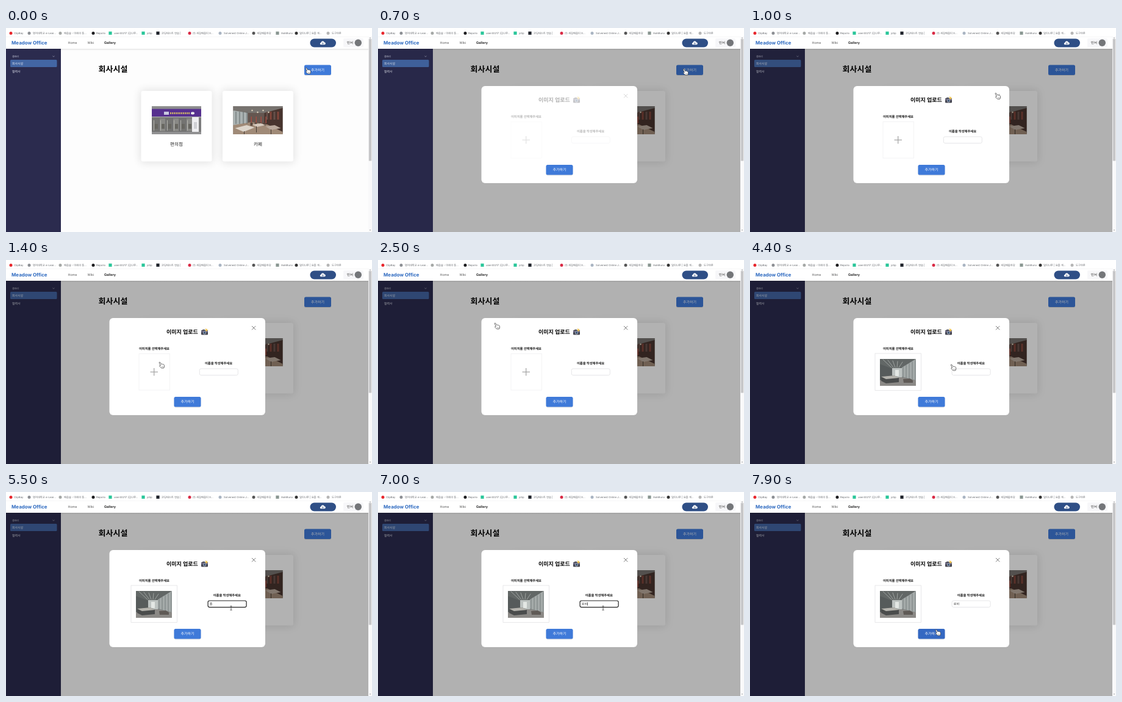
Recreate the animation shown at these times as an HTML page. Size 600x334 px, loop 8000 ms.

```html
<!DOCTYPE html>
<html lang="ko">
<head>
<meta charset="utf-8">
<title>Gallery upload</title>
<style>
  html, body { margin: 0; width: 100%; height: 100%; overflow: hidden; background: #fff; }
  svg { display: block; width: 100vw; height: 100vh; }
  svg svg { width: auto; height: auto; }
  text { font-family: Inter, "Noto Sans CJK KR", "Noto Sans CJK", sans-serif; white-space: pre; text-rendering: geometricPrecision; }
</style>
</head>
<body>
<svg id="stage" viewBox="0 0 600 334" xmlns="http://www.w3.org/2000/svg">
  <defs>
    <filter id="soft" x="-30%" y="-30%" width="160%" height="160%"><feGaussianBlur stdDeviation="7"/></filter>
    <linearGradient id="fade" x1="0" y1="0" x2="0" y2="1">
      <stop offset="0" stop-opacity=".1"/><stop offset="1" stop-opacity="0"/>
    </linearGradient>
    <clipPath id="pageClip"><rect y="34" width="594" height="300"/></clipPath>
  </defs>
  <g id="page" clip-path="url(#pageClip)"></g>
  <rect id="sideShade" y="34" width="90" height="300"/>
  <rect id="mainShade" x="90" y="34" width="504" height="300" opacity=".3"/>
  <g id="chrome"></g>
  <g id="modal"></g>
  <g id="hand">
    <path d="M-4-4.2C-3.6-5.2-2.5-5-2-4.1L-.3-1.2C.2-2 1-1.9 1.4-1.2 2-1.8 2.8-1.5 3-.8 3.8-1 4.3-.4 4.4.4L4.6 2.8 3.6 5H-.3L-3 2.2C-3.9 1.2-3 .3-2.1.7L-1.6 1Z"
      fill="#fff" stroke="#333" stroke-width=".7" stroke-linejoin="round"/>
    <path d="M.4 2V3.8M1.8 2V3.8M3.1 2V3.8" stroke="#555" stroke-width=".4"/>
  </g>
  <path id="beam" d="M-1.5-3.5Q0-3.5 0-2.7Q0-3.5 1.5-3.5M0-2.7V2.7M-1.5 3.5Q0 3.5 0 2.7Q0 3.5 1.5 3.5" fill="none" stroke="#333" stroke-width=".8"/>
</svg>
<script>
const $ = id => document.getElementById(id);
const LOOP = 8000, STEP = 100;

// y is the visual middle of the line
const text = (x, y, size, str, fill = '#111', extra = '') =>
  `<text x="${x}" y="${y + size * .37}" font-size="${size}" fill="${fill}" ${extra}>${str}</text>`;
const rect = (x, y, w, h, fill, extra = '') =>
  `<rect x="${x}" y="${y}" width="${w}" height="${h}" fill="${fill}" ${extra}/>`;
const path = (d, fill, extra = '') => `<path d="${d}" fill="${fill}" ${extra}/>`;
const dot = (x, y, r, fill) => `<circle cx="${x}" cy="${y}" r="${r}" fill="${fill}"/>`;
const line = (d, color, w) => path(d, 'none', `stroke="${color}" stroke-width="${w}" stroke-linecap="round"`);
const mid = 'text-anchor="middle"', bold = 'font-weight="700"';
const photo = (x, y, body) => `<g transform="translate(${x} ${y})">${body}</g>`;
const button = (x, y, w, h, id) =>
  rect(x, y + 1, w, h, '#000', 'rx="2.5" opacity=".12"') +
  rect(x, y, w, h, '#3f7ad9', `rx="2.5" id="${id}"`) +
  text(x + w / 2, y + h / 2, 6, '추가하기', '#fff', mid);

function shopPhoto() {
  let s = rect(0, 0, 81, 46, '#7d7d7e') + rect(0, 0, 81, 5, '#8d8d8e') +
    rect(0, 4.5, 81, 13, '#56308f') + rect(0, 17, 81, 1.5, '#aaa9ad') +
    rect(20, 9, 8, 5, '#c9c8e0') + rect(64, 9.5, 6, 4, '#eee', 'rx="2"') +
    rect(0, 18.5, 66, 24, '#727272');
  for (let i = 0; i < 11; i++) s += rect(30 + i * 3, 10, 2, 3, '#c8ae6a');
  for (let i = 0; i < 6; i++)
    s += rect(2 + i * 11, 20, 9, 21, i % 2 ? '#898986' : '#747472') +
      rect(3 + i * 11, 23, 1, 17, '#b3b3ac') + rect(5 + i * 11, 29, 5, 8, '#686761');
  return s + rect(66, 18, 11, 25, '#eeeef0') + rect(69, 26, 5, 11, '#cfd0d4') + rect(0, 42, 81, 4, '#929293');
}

function cafePhoto() {
  let s = rect(0, 0, 81, 46, '#5c4c45') + path('M0 0H81V5L52 12 24 11 0 8Z', '#77736f') +
    path('M0 7 24 11V29L0 32Z', '#aab2b2') + rect(24, 11, 27, 17, '#655650') +
    path('M51 11 81 3V44L51 31Z', '#47342e') + path('M0 31 30 26 56 30 81 42V46H0Z', '#a08a77');
  for (let i = 0; i < 4; i++)
    s += rect(4 + i * 6, 9, 1, 20, '#5f6766') + rect(54 + i * 6, 9, 3, 13, i % 2 ? '#81453a' : '#66504a') +
      rect(29 + i * 8, 17, 1.5, 11, '#a34d42') + rect(28 + i * 7, 27, 4, 5, '#59463c') +
      dot(31 + i * 9, 7 + i % 2 * 3, 1.2, '#e0d4bd');
  return s + path('M3 36 22 31 35 35 17 42Z', '#ddd5cb') + path('M31 30 45 28 53 31 39 34Z', '#d5c9bd') +
    path('M53 33 68 31 78 36 62 39Z', '#b9a99c') + path('M18 41V46M62 38V46M38 33V43', 'none', 'stroke="#443a32"');
}

function lobbyPhoto() {
  let s = rect(0, 0, 59, 44, '#7f8484') + path('M0 0H59L36 15 20 17 0 8Z', '#626766') +
    path('M0 8 20 16V31L0 35Z', '#565b5b') + path('M36 14 59 0V35L36 29Z', '#a4aaa9') +
    rect(20, 15, 16, 15, '#bdc3c1') + path('M0 35 20 30H36L59 35V44H0Z', '#8b8986');
  for (let i = 0; i < 5; i++)
    s += line(`M${38 + i * 5} ${13 - i * 2.7}V${30 + i}`, '#6e7574', .8) +
      line(`M${5 + i * 8} ${1 + i}L${19 + i * 3} 14`, '#c8cdca', .6);
  return s + path('M2 29 24 27 31 31V38L10 40 2 36Z', '#4a4c4c') + path('M2 29 24 27 31 31 10 33Z', '#b4b3ad') +
    rect(25, 18, 6, 10, '#e3e7e4') + path('M38 33 49 32 54 35V39H39Z', '#5f5a56');
}

function card(x, label, body) {
  return rect(x - 2, 101, 120, 120, '#000', 'rx="6" opacity=".1" filter="url(#soft)"') +
    rect(x, 103, 116, 115.5, '#fff', 'rx="3"') + photo(x + 17.5, 128, body) +
    text(x + 58, 190, 7.6, label, '#222', mid);
}

$('page').innerHTML =
  rect(0, 34, 594, 300, '#fdfdfd') +
  rect(0, 34, 90, 300, '#2b2b4e') +
  rect(7, 52, 76.5, 12, '#4366a4', 'rx="1.5"') +
  text(10, 47, 4, '갤러리', '#d5d7e4') +
  line('M76.7 46 78 47.2 79.3 46', '#b9bccd', .6) +
  text(10, 58, 4.9, '회사시설', '#e9ecf5') +
  text(10, 71, 4.9, '협력사', '#e9ecf5') +
  text(151.5, 67.5, 13, '회사시설', '#000', bold) +
  button(489, 60.5, 44, 16.5, 'openBtn') +
  card(221.5, '편의점', shopPhoto()) +
  card(355, '카페', cafePhoto());

// icon x, label, icon colour, label x, square icon
const marks = [
  [8, 'ClipBay', '#e8262c', 13], [38, '명지대학교 e-Lear...', '#8c8f94', 44],
  [89, '배움숲 - 미래의 동...', '#a5a8a6', 95], [143, 'Repolio', '#1d1d1f', 148],
  [171, 'user40217 (김나루...', '#2cc79b', 177, true], [225, 'jotip', '#2cc79b', 231, true],
  [249, '코딩테스트 연습 |', '#20242c', 255, true], [301, '(1) 새길배움터 X...', '#d92a45', 306],
  [351, 'Solvenest Online J...', '#a9b4c2', 357], [406, '새길배움마당', '#555', 411],
  [445, 'AskMuno', '#8a9792', 451, true], [476, '일터나루 | 요즘 개...', '#333', 481],
  [528, '도구마루', '#b5b5b5', 534]
];
const mark = ([x, str, color, tx, square]) =>
  (square ? rect(x - 2.6, 5.8, 5.2, 5.2, color) : dot(x, 8.4, 2.5, color)) + text(tx, 8.4, 4.3, str, '#63666b');

$('chrome').innerHTML =
  rect(0, 0, 600, 34, '#fff') + rect(0, 34, 594, 3, 'url(#fade)') + rect(0, 14, 600, .6, '#f0f0f2') +
  marks.map(mark).join('') +
  text(9, 24.3, 7.9, 'Meadow Office', '#2e6ac0', bold) +
  text(101.5, 24.3, 5.3, 'Home', '#555') + text(133.5, 24.3, 5.3, 'Wiki', '#555') +
  text(161, 24.3, 5.5, 'Gallery', '#111', 'font-weight="600"') +
  rect(498.5, 17.5, 42.5, 14, '#2f4f86', 'rx="7"') +
  path('M516.5 27.3C514.3 27.3 514.3 24.2 516.4 24 516.6 20.8 521 20.6 521.7 23.3 524.4 23.2 524.6 27.3 522 27.3Z', '#fff') +
  line('M519.3 26.5V24.3M518.2 25.3 519.3 24.2 520.4 25.3', '#2f4f86', .7) +
  rect(553, 17, 33, 14.5, '#f7f7f9', 'rx="2"') +
  text(559, 24.3, 5.5, '민서', '#222') + dot(577.3, 24.3, 5.7, '#747679') +
  rect(594, 14.6, 6, 319.4, '#f9f9fa') + rect(594.8, 18, 4.4, 199.5, '#c6c6c8') +
  path('M595.8 16.8H598.2L597 15.5ZM595.8 330.5H598.2L597 331.8Z', '#777');

const camera =
  rect(322, 113.6, 4, 2, '#6f7079') + rect(320, 115, 11, 7.5, '#43444f', 'rx="1"') +
  rect(320, 116.6, 11, 1.2, '#8c84ad') + path('M328 112 329 113.7 331 113.3 329.8 115 330.6 116.5H326.8L327.5 114.6 326.4 113.4Z', '#f0c34a') +
  dot(325.5, 119, 2.7, '#a3a5b3') + dot(325.5, 119, 1.8, '#3d5878');

$('modal').innerHTML =
  rect(169.5, 95, 255.5, 159, '#fff', 'rx="6"') +
  '<g id="form">' +
  text(263, 118, 9, '이미지 업로드', '#000', bold) + camera +
  line('M403.4 108.4 409 114M409 108.4 403.4 114', '#777', 1) +
  text(243, 145.2, 5.3, '이미지를 선택해주세요', '#111', `${mid} ${bold}`) +
  '<g id="empty">' + rect(218, 153.5, 50.5, 59.5, '#fff', 'stroke="#f0f0f2" stroke-width=".8"') +
  path('M236.5 183.3H249M242.7 177V189.5', 'none', 'stroke="#a8a8a8" stroke-width="1.3"') + '</g>' +
  '<g id="chosen">' + rect(205, 153, 75.5, 60.5, '#fff', 'stroke="#e2e2e4" stroke-width=".8"') +
  photo(213, 162, lobbyPhoto()) + '</g>' +
  '<g id="field">' + text(348.5, 169, 5.3, '이름을 작성해주세요', '#111', `${mid} ${bold}`) +
  rect(317.3, 178, 63, 10.6, '#fff', 'id="input" rx="2.5"') +
  text(320, 183.4, 5, '', '#333', 'id="value"') +
  rect(320.2, 180.6, .6, 5.4, '#222', 'id="caret"') + '</g></g>' +
  button(275.5, 224, 44, 16.5, 'addBtn');

const cursor = [
  [0, 495, 70], [100, 495, 70], [400, 504, 72], [700, 504, 72], [1400, 255, 172], [1600, 255, 172],
  [2400, 195, 108], [2500, 195, 108], [3100, 158, 103], [3300, 158, 103], [3600, 140, 100],
  [4100, 140, 100], [4500, 369, 190], [7000, 369, 190], [7700, 308, 230], [LOOP, 308, 230]
];
const typed = [[0, ''], [5100, 'ㄹ'], [5400, '로'], [5500, '롭'], [6000, '로비']];

const ramp = (t, a, b) => Math.min(1, Math.max(0, (t - a) / (b - a)));
const ease = p => p * p * (3 - 2 * p);
const show = (id, on) => $(id).setAttribute('visibility', on ? 'inherit' : 'hidden');
const set = (id, attrs) => { for (const k in attrs) $(id).setAttribute(k, attrs[k]); };

function cursorAt(t) {
  const i = cursor.findIndex((k, n) => n && t <= k[0]);
  const [t0, x0, y0] = cursor[i - 1], [t1, x1, y1] = cursor[i];
  const p = ease(ramp(t, t0, t1));
  return [x0 + (x1 - x0) * p, y0 + (y1 - y0) * p];
}

function draw(t) {
  const open = t >= 700, chosen = t >= 4100, focused = t >= 4500 && t < 7500;
  show('modal', open);
  show('mainShade', open);
  show('sideShade', open);
  set('sideShade', { opacity: .06 + .24 * ramp(t, 700, 1100) });
  set('form', { opacity: .3 + .7 * ramp(t, 700, 1000) });

  show('empty', !chosen);
  show('chosen', chosen);
  set('field', { transform: `translate(${chosen ? 13.8 : 0} 0)` });
  set('input', { stroke: focused ? '#222' : '#dcdcdf', 'stroke-width': focused ? 1.2 : .7 });

  const value = typed.filter(k => t >= k[0]).pop()[1];
  $('value').textContent = value;
  const blink = t < 4900 || (t >= 6000 && Math.floor(t / 500) % 2 === 0);
  show('caret', focused && blink);
  set('caret', { x: 320.2 + value.length * 4.6 });
  set('addBtn', { fill: t >= 7600 ? '#3468c2' : '#3f7ad9' });

  const [x, y] = cursorAt(t), beam = t >= 4500 && t < 7200;
  show('beam', beam);
  show('hand', !beam);
  set(beam ? 'beam' : 'hand', { transform: `translate(${x} ${y})` });
}

function frame() {
  const t = performance.now() % LOOP;
  draw(Math.floor(t / STEP) * STEP);
  requestAnimationFrame(frame);
}
frame();
</script>
</body>
</html>
```
